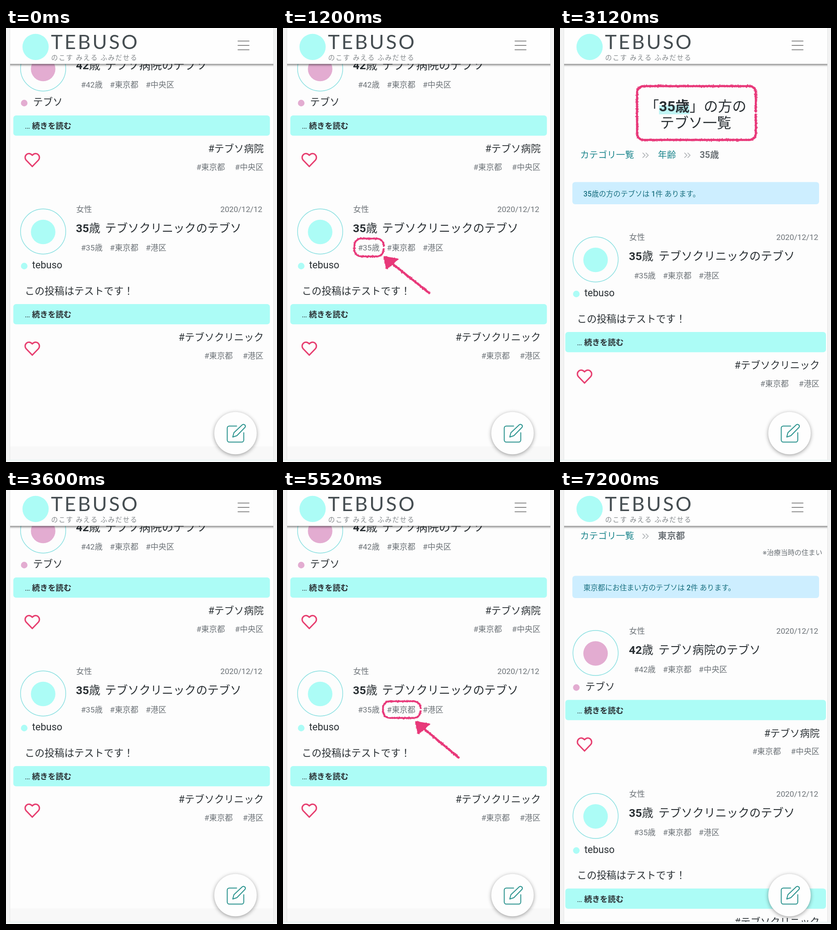
These frames come from a looping animation (591x948 px, 8000 ms). An HTML page with a canvas:

```html
<!DOCTYPE html>
<html lang="ja">
<head>
<meta charset="utf-8">
<style>
  html, body { margin: 0; width: 100%; height: 100%; overflow: hidden; background: #f3f3f3; }
  canvas { display: block; }
</style>
</head>
<body>
<canvas id="stage" width="591" height="948"></canvas>
<script>
const ctx = document.getElementById('stage').getContext('2d');
const INK = '#2a3034', GRAY = '#6c7277', TEAL = '#1b858c', MINT = '#acfcf6',
      PINK = '#e3acd1', ROSE = '#e73f70', CRAYON = '#e8397a';

const cards = {
  hospital: { age: '42', place: 'テブソ病院', ward: '#中央区', name: 'テブソ', color: PINK },
  clinic: { age: '35', place: 'テブソクリニック', ward: '#港区', name: 'tebuso', color: MINT,
            post: 'この投稿はテストです！' }
};

function setFont(size, weight = 400, family = 'Roboto') {
  ctx.font = `${weight} ${size}px ${family}, "Noto Sans CJK JP", "Noto Sans CJK", sans-serif`;
}

// Draws text on its baseline and returns the advance width.
function text(str, x, y, size, color = INK, weight = 400, align = 'left') {
  setFont(size, weight);
  ctx.textAlign = align;
  ctx.fillStyle = color;
  ctx.fillText(str, x, y);
  return ctx.measureText(str).width;
}

function rect(x, y, w, h, color, radius = 0) {
  ctx.fillStyle = color;
  ctx.beginPath();
  ctx.roundRect(x, y, w, h, radius);
  ctx.fill();
}

function disc(x, y, r, color) {
  ctx.fillStyle = color;
  ctx.beginPath();
  ctx.arc(x, y, r, 0, 7);
  ctx.fill();
}

function stroke(d, color, width) {
  ctx.strokeStyle = color;
  ctx.lineWidth = width;
  ctx.lineCap = ctx.lineJoin = 'round';
  ctx.stroke(new Path2D(d));
}

function withShadow(blur, dy, alpha, draw) {
  ctx.save();
  ctx.shadowColor = `rgba(0,0,0,${alpha})`;
  ctx.shadowBlur = blur;
  ctx.shadowOffsetY = dy;
  draw();
  ctx.restore();
}

// cy is the centre of the avatar; spread widens the card about its middle.
function card({ age, place, ward, name, color, post }, cy, spread = 1) {
  const X = x => 295.5 + (x - 295.5) * spread;
  const small = 17.2, medium = 21.55, large = 24.8;

  ctx.strokeStyle = '#86dfe0';
  ctx.lineWidth = 1.4;
  ctx.beginPath();
  ctx.arc(X(81), cy, 49.3, 0, 7);
  ctx.stroke();
  disc(X(81), cy + 1, 26.7, color);

  text('女性', X(153), cy - 42.5, small, GRAY);
  text('2020/12/12', X(559), cy - 42.5, small, GRAY, 400, 'right');
  let x = X(152.5);
  x += text(age, x, cy + 1.5, large, INK, 700);
  text('歳', x, cy + 1.5, large, INK, 500);
  text(place + 'のテブソ', X(216), cy + 1.5, large);

  x = X(163.5);
  for (const tag of [`#${age}歳`, '#東京都', ward]) x += text(tag, x, cy + 41.5, small, GRAY) + 16;

  disc(X(39.7), cy + 75.5, 7.2, color);
  text(name, X(post ? 57 : 59), cy + 80.5, medium);
  if (post) text(post, X(41), cy + 137, medium);

  const top = cy + (post ? 158.5 : 102.5);
  rect(X(16), top, X(575.5) - X(16), 44.3, MINT, 6);
  x = X(41);
  x += text('… ', x, top + 29, small);
  text('続きを読む', x, top + 29, small, INK, 700);

  text('#' + place, X(562), top + 80, medium, INK, 400, 'right');
  const wardWidth = text(ward, X(561.5), top + 118.5, small, GRAY, 400, 'right');
  text('#東京都', X(561.5) - wardWidth - 22, top + 118.5, small, GRAY, 400, 'right');

  ctx.save();
  ctx.translate(X(57.3), top + 97);
  stroke('M0 14.5L-13.5 .5C-20-7-10-20 0-10C10-20 20-7 13.5 .5Z', ROSE, 3.1);
  ctx.restore();
}

function pageTitle(before, bold, after) {
  const size = 31, y = 181.5;
  setFont(size, 700);
  const boldWidth = ctx.measureText(bold).width;
  setFont(size);
  const beforeWidth = ctx.measureText(before).width;
  let x = 295.7 - (beforeWidth + boldWidth + ctx.measureText(after).width) / 2;
  x += text(before, x, y, size);
  rect(x, 169, boldWidth, 19.5, '#bff4f4');
  x += text(bold, x, y, size, INK, 700);
  text(after, x, y, size);
  text('テブソ一覧', 295.7, 218, size, INK, 400, 'center');
}

function breadcrumb(items, y) {
  let x = 44;
  items.forEach((item, i) => {
    const last = i === items.length - 1;
    x += text(item, x, y + 7.3, 19.6, last ? GRAY : TEAL, last ? 700 : 400);
    if (last) return;
    for (const dx of [19, 26]) stroke(`M${x + dx} ${y - 4}l5 5l-5 5`, '#a9adb0', 1.6);
    x += 52;
  });
}

function notice(str, y) {
  rect(27, y, 538, 48.5, '#cdeeff', 6);
  text(str, 51, y + 31.5, 15.8, '#1a7080', 500);
}

// A stroke with a grainy, waxy edge.
function crayon(d, width) {
  let seed = 7;
  const random = () => (seed = seed * 16807 % 2147483647) / 2147483647;
  const path = document.createElementNS('http://www.w3.org/2000/svg', 'path');
  path.setAttribute('d', d);
  stroke(d, CRAYON, width * .62);
  const length = path.getTotalLength();
  for (let s = 0; s < length; s += .6) {
    const p = path.getPointAtLength(s);
    const angle = random() * 7, r = width * .47 * Math.sqrt(random());
    disc(p.x + r * Math.cos(angle), p.y + r * Math.sin(angle), .5 + random() * .7, CRAYON);
  }
}

// A rounded frame with a small gap halfway down its right side.
function ring(x, y, w, h, r, width) {
  const right = x + w, mid = y + h / 2;
  crayon(`M${right} ${mid + 3}V${y + h - r}a${r} ${r} 0 0 1 ${-r} ${r}H${x + r}a${r} ${r} 0 0 1 ${-r} ${-r}` +
         `V${y + r}a${r} ${r} 0 0 1 ${r} ${-r}H${right - r}a${r} ${r} 0 0 1 ${r} ${r}V${mid - 3}`, width);
}

function arrow(x, y, dx, dy) {
  const head = `M${x + 2} ${y + 2}l28 5l-23 20z`;
  crayon(`M${x + 16} ${y + 14}L${x + dx} ${y + dy}`, 7);
  ctx.fillStyle = CRAYON;
  ctx.fill(new Path2D(head));
  crayon(head, 5);
}

function home() {
  card(cards.hospital, 88.5);
  card(cards.clinic, 444.5);
  rect(9, 914, 574, 34, '#f8f8f8');
}

function ageList() {
  pageTitle('「', '35歳', '」の方の');
  breadcrumb(['カテゴリ一覧', '年齢', '35歳'], 277);
  notice('35歳の方のテブソは 1件 あります。', 336.5);
  card(cards.clinic, 505.5, 1.016);
  ring(168, 127, 259, 117.5, 14, 7);
}

function cityList(scroll) {
  ctx.save();
  ctx.translate(0, -scroll);
  pageTitle('「', '東京都', '」 にお住まいの方の');
  breadcrumb(['カテゴリ一覧', '東京都'], 256.5);
  text('※治療当時の住まい', 572, 298.5, 15.1, GRAY, 400, 'right');
  notice('東京都にお住まい方のテブソは 2件 あります。', 344);
  card(cards.hospital, 512.5, 1.016);
  card(cards.clinic, 868.5, 1.016);
  ctx.restore();
}

function chrome() {
  ctx.save();
  ctx.beginPath();
  ctx.rect(9, 0, 574, 90);
  ctx.clip();
  withShadow(4, 2, .5, () => rect(0, -10, 591, 88.5, '#fefefe'));
  ctx.restore();
  disc(64.5, 41.3, 28.6, MINT);
  ctx.letterSpacing = '4px';
  setFont(43.3, 400, 'Lato');
  ctx.textAlign = 'left';
  ctx.fillStyle = '#454d51';
  ctx.fillText('TEBUSO', 98, 46);
  ctx.letterSpacing = '1.6px';
  text('のこす みえる ふみだせる', 98.5, 70, 14.6, '#83888b');
  ctx.letterSpacing = '0px';
  for (const y of [28.5, 38, 47.5]) stroke(`M506 ${y}H530`, '#8b8b8b', 1.9);

  rect(0, 943.5, 591, 5, '#fafcfc');
  rect(0, 943.5, 591, 1, '#d9eeec');
  withShadow(9, 2, .38, () => disc(500.5, 885, 46.3, '#fefefe'));
  stroke('M503 869.5H487a4.5 4.5 0 0 0-4.5 4.5V900a4.5 4.5 0 0 0 4.5 4.5H514a4.5 4.5 0 0 0 4.5-4.5V884' +
         'M494.5 893.5l2.5-9.5L515.5 866.5a4.2 4.2 0 0 1 5.8 5.8L503.5 890.5z', '#2c948f', 2);
}

const scenes = [
  home,
  () => { home(); ring(155.5, 460, 64, 39, 15, 5.5); arrow(219, 498, 100, 81); },
  ageList,
  home,
  () => { home(); ring(218, 461.5, 82, 36.5, 15, 5.5); arrow(288, 504.5, 95, 80); },
  () => { cityList(0); ring(89, 135, 428, 97.5, 13, 7); },
  () => cityList(156.5)
];

let shown = -1;
function tick(now) {
  const scene = Math.floor(now % 8000 / 1200);
  if (scene !== shown) {
    shown = scene;
    rect(0, 0, 591, 948, '#f3f3f3');
    rect(8, 0, 576, 948, '#e2e4e4');
    rect(9, 0, 574, 948, '#fdfdfd');
    scenes[scene]();
    chrome();
  }
  requestAnimationFrame(tick);
}
tick(performance.now());
</script>
</body>
</html>
```
